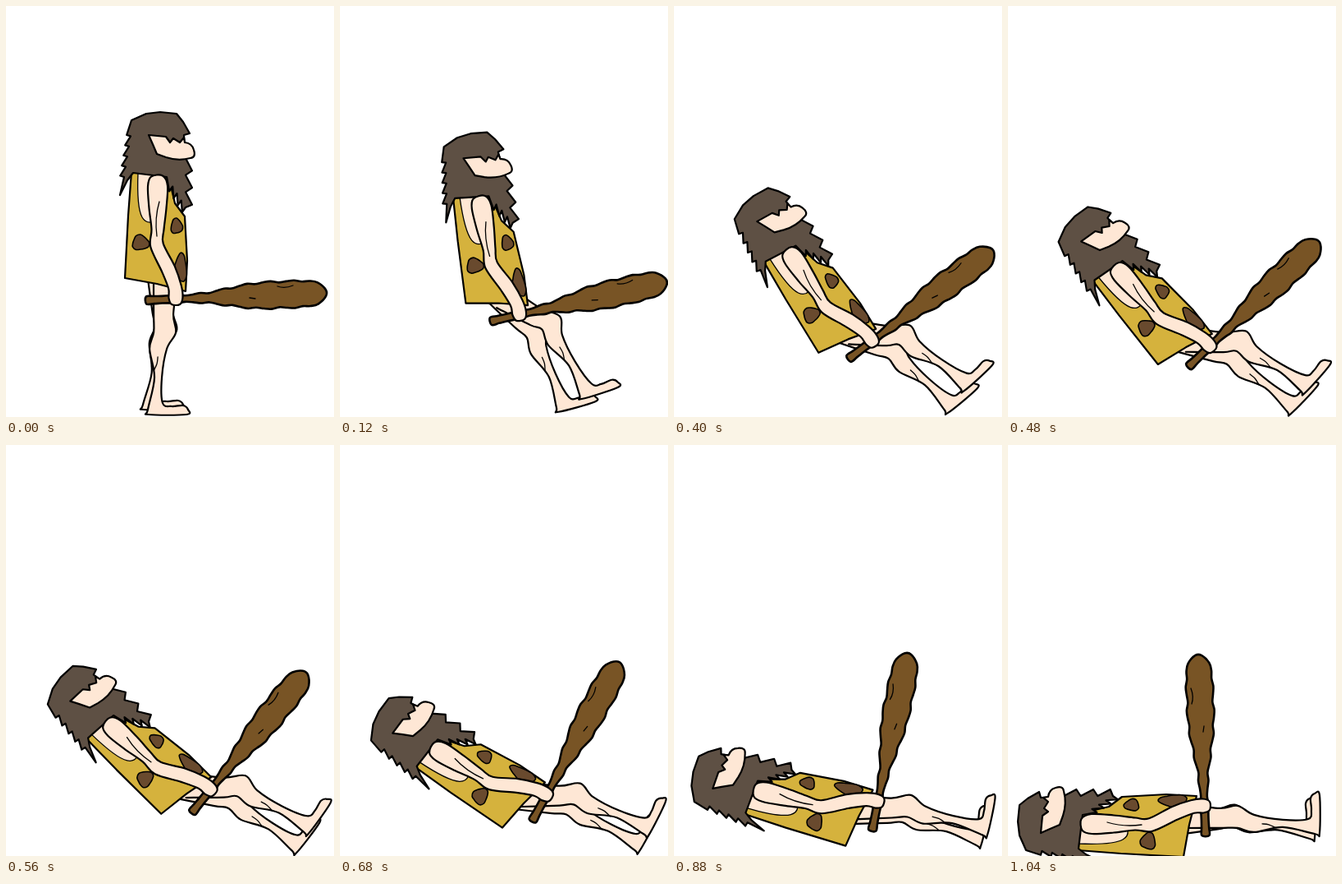
Recreate the animation shown at these times as an HTML page. Size 400x500 px, loop 3.16 s.

```html
<!DOCTYPE html>
<html lang="en">
<head>
<meta charset="utf-8">
<title>Falling caveman</title>
<style>
  html, body { margin: 0; width: 100%; height: 100%; overflow: hidden; background: #fff; }
  svg { display: block; width: 100%; height: 100%; }
  path { stroke: #000; stroke-width: 2.2; stroke-linejoin: round; stroke-linecap: round; }
  .skin { fill: #fee7d5; }
  .hair { fill: #5e5044; }
  .hide { fill: #d5b23d; }
  .spot { fill: #694a2e; stroke-width: 1.6; }
  .wood { fill: #785425; stroke-width: 2.6; }
  .thin { stroke-width: 1.3; }
  .line { fill: none; stroke-width: 1.3; }
</style>
</head>
<body>
<svg viewBox="0 0 400 500">
  <path id="backLeg" class="skin"/>
  <path id="backCalf" class="line"/>
  <path id="frontLeg" class="skin"/>
  <path id="frontCalf" class="line"/>
  <g id="body"></g>
</svg>
<script>
const LOOP = 3160, STEP = 40, FALL = 1040;
const PIVOT = [193, 251], LANDED = [134, 453];

const $ = id => document.getElementById(id);
const rad = deg => deg * Math.PI / 180;
const mix = (a, b, u) => a + (b - a) * u;
const mixPoint = (p, q, u) => [mix(p[0], q[0], u), mix(p[1], q[1], u)];
const range = n => Array.from({ length: n }, (_, i) => i);
const smooth = u => { u = Math.max(0, Math.min(1, u)); return u * u * (3 - 2 * u); };
const xy = p => p[0].toFixed(2) + ' ' + p[1].toFixed(2);
const polygon = pts => 'M' + pts.map(xy).join('L') + 'Z';

function turn([x, y], a, [ox, oy]) {
  const c = Math.cos(a), s = Math.sin(a);
  return [ox + x * c - y * s, oy + x * s + y * c];
}

// Smooth curve through all points
function curve(pts, closed) {
  const n = pts.length;
  const at = i => closed ? pts[(i + n) % n] : pts[Math.max(0, Math.min(n - 1, i))];
  let d = 'M' + xy(pts[0]);
  for (let i = 0; i < (closed ? n : n - 1); i++) {
    const [a, b, c, e] = [at(i - 1), at(i), at(i + 1), at(i + 2)];
    const c1 = b.map((v, k) => v + (c[k] - a[k]) / 6);
    const c2 = c.map((v, k) => v - (e[k] - b[k]) / 6);
    d += 'C' + [c1, c2, c].map(xy).join(' ');
  }
  return closed ? d + 'Z' : d;
}

// Tufts of hair along a line, each tip pushed out by `out`
function tufts(from, to, n, out) {
  return range(n).flatMap(i => {
    const tip = mixPoint(from, to, (i + 0.6) / n);
    return [mixPoint(from, to, i / n), [tip[0] + out[0], tip[1] + out[1]]];
  });
}

function blob(x, y, rx, ry) {
  return curve(range(12).map(i => {
    const a = i * Math.PI / 6, r = 1 + 0.13 * Math.sin(3 * a + x);
    return [x + rx * r * Math.cos(a), y + ry * r * Math.sin(a)];
  }), true);
}

// Outline of a rod given as [x, y, half width] stations
function limb(stations) {
  const side = sign => stations.map(([x, y, w], i) => {
    const p = stations[Math.max(0, i - 1)], q = stations[Math.min(stations.length - 1, i + 1)];
    const dx = q[0] - p[0], dy = q[1] - p[1], len = Math.hypot(dx, dy);
    return [x - sign * w * dy / len, y + sign * w * dx / len];
  });
  return curve([...side(1), ...side(-1).reverse()], true);
}

function clubStation(i, _, all) {
  const u = i / (all.length - 1);
  const swell = 4.5 + 11.5 * smooth((u - 0.23) / 0.45) + smooth(u * 3) * 1.1 * Math.sin(i * 2.1);
  const cap = Math.sqrt(1 - Math.max(0, (u - 0.87) / 0.13) ** 2 * 0.93);
  return [mix(171, 390, u), mix(358, 349, u), swell * cap];
}

function add(cls, d) {
  const p = document.createElementNS('http://www.w3.org/2000/svg', 'path');
  p.setAttribute('class', cls);
  p.setAttribute('d', d);
  $('body').append(p);
}

// Tunic
add('hide', 'M153 202L198 206 206 240 218 256 221 310 219 347 184 338 145 331 149 255Z');
add('skin thin', 'M161 203C160 228 161 248 166 257Q170 264 177 263L186 204Z');
add('spot', blob(164, 288, 10, 9));
add('spot', blob(208, 268, 7, 9));
add('spot', blob(213, 319, 7.5, 17));

// Head
add('hair', polygon([
  [153, 139], [171, 131], [188, 129], [208, 131], [216, 141], [224, 155], [217, 157],
  ...tufts([219, 185], [219, 247], 3, [8, 3]),
  ...tufts([219, 245], [198, 211], 4, [-1, 11]),
  [196, 208], [155, 203], [148, 212], [139, 230],
  ...tufts([144, 208], [154, 146], 5, [-6, 6])
]));
add('skin', `M174 157L195 159 200 166 204 161 212 166 217 160 218 166
  Q227 167 229 175Q232 184 225 185Q210 189 195 184L184 180Q179 168 174 157Z`);

// Club
add('wood', limb(range(24).map(clubStation)));
add('line', 'M331 341Q340 344 350 340M297 355L304 356');

// Arm and hand
add('skin', limb([[184, 207, 7], [185, 219, 12], [185, 246, 10.5], [185, 272, 7.5],
  [184, 291, 8], [198, 320, 8.5], [206, 342, 8], [207, 355, 8.5], [207, 363, 5]]));
add('line', 'M187 238Q181 258 184 280');

// Leg stations: [distance below the joint, front edge, back edge]
const THIGH = 62, SHIN = 87, SHIN_REST = Math.atan2(86, -13);
const thigh = [[-6, 15, -15], [40, 9, -15]];
const shin = [[0, 12, -15], [20, 1, -20], [55, -5, -14]];
const foot = [[9, 0], [20, 4], [34, 3], [40, 8], [38, 14], [-8, 14], [-9, 8]];
const calf = [[-10, 30], [-11, 38], [-15, 47]];
const legs = {
  back: { hip: [188, 331], ankle: [176, 477], swing: 43, bend: 0.06 },
  front: { hip: [195, 335], ankle: [182, 483], swing: 62, bend: 0.18 }
};

function drawLeg(name, s, place, bodyTurn) {
  const leg = legs[name];
  // The legs fly up quickly, then settle back in line with the body
  const lift = leg.swing * (1 - s) * (1 - Math.exp(-s / 0.105));
  const hip = place(leg.hip);
  const dx = leg.ankle[0] - leg.hip[0], dy = leg.ankle[1] - leg.hip[1];
  const reach = Math.hypot(dx, dy) - leg.bend * lift;
  const aim = Math.atan2(dy, dx) + bodyTurn - rad(lift);
  const ankle = turn([reach, 0], aim, hip);
  const up = aim - Math.acos((THIGH ** 2 + reach ** 2 - SHIN ** 2) / (2 * THIGH * reach));
  const knee = turn([THIGH, 0], up, hip);
  const thighTurn = up - Math.PI / 2;
  const shinTurn = Math.atan2(ankle[1] - knee[1], ankle[0] - knee[0]) - SHIN_REST;
  const edge = k => [
    ...thigh.map(p => turn([p[k], p[0]], thighTurn, hip)),
    ...shin.map(p => turn([p[k], p[0]], shinTurn, knee))
  ];
  const sole = foot.map(p => turn(p, bodyTurn - rad(lift * 0.2), ankle));
  $(name + 'Leg').setAttribute('d', curve([...edge(1), ...sole, ...edge(2).reverse()]));
  $(name + 'Calf').setAttribute('d', curve(calf.map(p => turn(p, shinTurn, knee))));
}

function draw(ms) {
  const s = Math.min(1, Math.floor((ms % LOOP) / STEP) * STEP / FALL);
  const angle = -90 * s, centre = mixPoint(PIVOT, LANDED, s);
  const place = p => turn([p[0] - PIVOT[0], p[1] - PIVOT[1]], rad(angle), centre);
  $('body').setAttribute('transform',
    `translate(${centre}) rotate(${angle}) translate(${-PIVOT[0]} ${-PIVOT[1]})`);
  for (const name in legs) drawLeg(name, s, place, rad(angle));
}

const start = performance.now();
function tick() {
  draw(performance.now() - start);
  requestAnimationFrame(tick);
}
tick();
</script>
</body>
</html>
```
